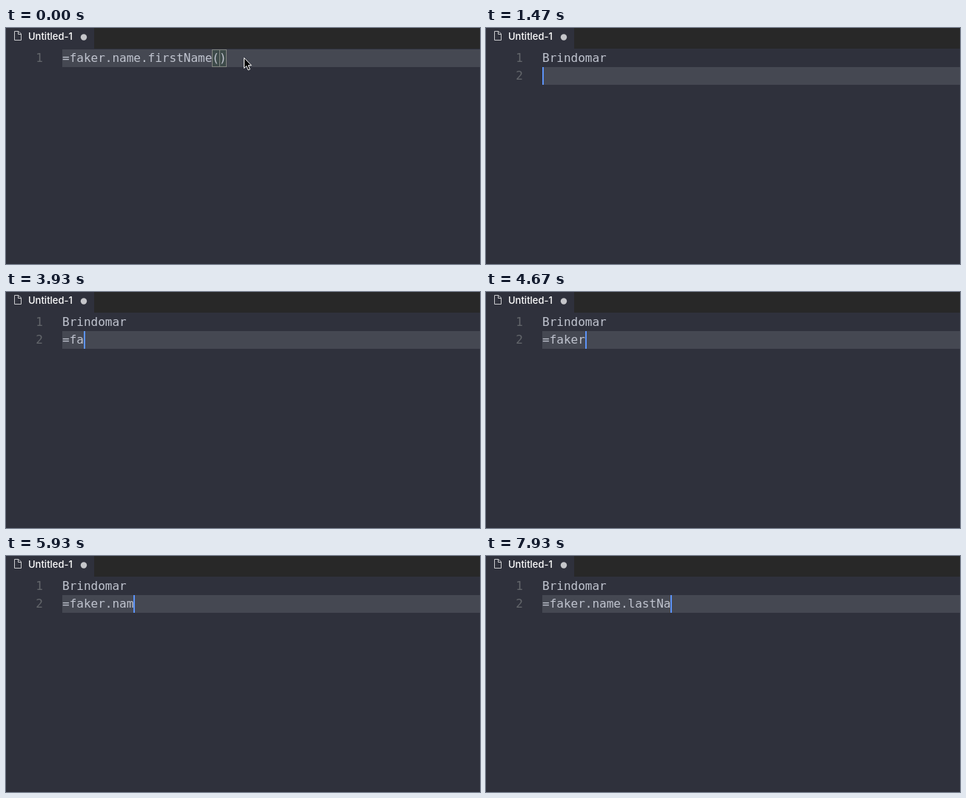
An HTML page that plays this animation: 640 px wide and 320 px high, repeating every 8000 ms.

```html
<!DOCTYPE html>
<html lang="en">
<head>
<meta charset="utf-8">
<title>Untitled-1</title>
<style>
  html, body { margin: 0; width: 100%; height: 100%; overflow: hidden; background: #2f313c; }
  svg { display: block; width: 640px; height: 320px; }
  text { white-space: pre; }
  .code { font: 16px "DejaVu Sans Mono", monospace; fill: #c0c4cf; }
  .num { font: 16px "DejaVu Sans Mono", monospace; fill: #63666b; text-anchor: end; }
  .tab { font: 500 13px Inter, sans-serif; fill: #fff; }
</style>
</head>
<body>
<svg viewBox="0 0 640 320">
  <rect width="640" height="320" fill="#2f313c"/>
  <rect x="119" width="521" height="28" fill="#282828"/>
  <path d="M11.5 4.5H17L20.5 8V16.5H11.5ZM16.5 4.5V8.5H20.5" fill="none" stroke="#c8c9cc"/>
  <text class="tab" x="30" y="16">Untitled-1</text>
  <circle cx="105" cy="12.5" r="4.2" fill="#c5c6ca"/>

  <rect id="active" x="76" y="29" width="564" height="24" fill="#454852"/>
  <g id="brackets" fill="#006400" fill-opacity=".1" stroke="#80847f">
    <rect x="278.5" y="29.5" width="10" height="23"/>
    <rect x="288.5" y="29.5" width="9" height="23"/>
  </g>
  <text class="num" x="50" y="46">1</text>
  <text class="num" x="50" y="70" id="num2">2</text>
  <text class="code" x="76" y="46" id="line1"></text>
  <text class="code" x="76" y="70" id="line2"></text>
  <rect id="caret" width="2" height="24" fill="#5c92f5"/>
  <path id="pointer" d="M321.5 40.5V54.5L324.7 51.5L327 57L329.4 56L327.1 50.7H331.3Z"
        fill="#000" stroke="#fff" stroke-linejoin="round"/>
</svg>
<script>
const LOOP = 8000, LEFT = 76, TOP = 29, ROW = 24, CHAR = 9.633;
const RUN = 70, ENTER = 1470;
const FORMULA = "=faker.name.firstName()", RESULT = "Brindomar";
const TYPED = "=faker.name.lastNa";
// One time per typed character
const KEYS = [2670, 3800, 3930, 4200, 4400, 4670, 4930,
              5600, 5730, 5870, 6000, 6330,
              6930, 7070, 7200, 7400, 7730, 7870];
const BLINKS = [600, 1130, 2000, 2470, 3130, 3670, 5470, 6800];

const el = id => document.getElementById(id);
const show = (id, on) => el(id).setAttribute("visibility", on ? "visible" : "hidden");
const setText = (id, s) => { if (el(id).textContent !== s) el(id).textContent = s; };

function draw(t) {
  const done = t >= RUN, second = t >= ENTER;
  const count = KEYS.filter(k => k <= t).length;
  const first = done ? RESULT : FORMULA;
  const typed = TYPED.slice(0, count);
  const lastKey = count ? KEYS[count - 1] : second ? ENTER : RUN;
  const blinks = BLINKS.filter(b => b > lastKey && b <= t).length;
  const y = TOP + (second ? ROW : 0);
  const column = second ? count : RESULT.length;

  setText("line1", first);
  setText("line2", typed);
  show("num2", second);
  show("brackets", !done);
  show("pointer", !done);
  show("caret", done && blinks % 2 === 0);
  el("active").setAttribute("y", y);
  el("caret").setAttribute("x", Math.round(LEFT + column * CHAR));
  el("caret").setAttribute("y", y);
}

const start = performance.now();
function frame() {
  draw((performance.now() - start) % LOOP);
  requestAnimationFrame(frame);
}
draw(0);
requestAnimationFrame(frame);
</script>
</body>
</html>
```
